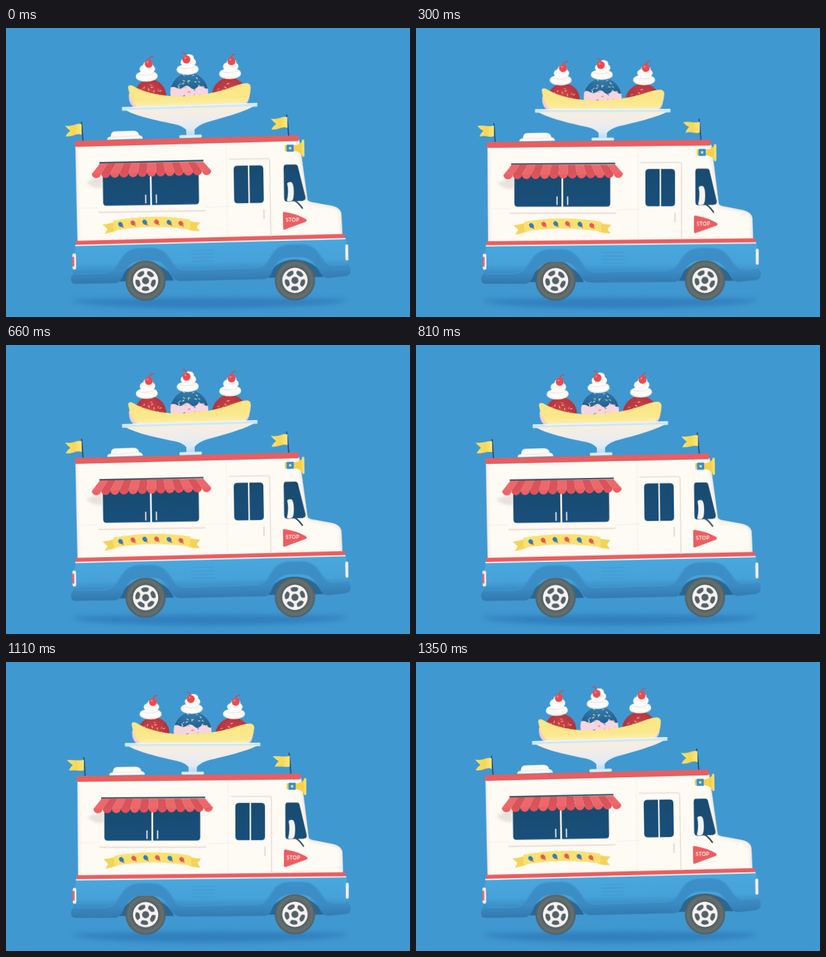
These frames come from a looping animation (683x489 px, 1380 ms). An HTML page:

```html
<!DOCTYPE html>
<html lang="en">
<head>
<meta charset="utf-8">
<title>Ice cream truck</title>
<style>
html, body { margin: 0; width: 100%; height: 100%; overflow: hidden; background: #4098d0; }
svg { display: block; width: 683px; height: 489px; }
.bob, .sundae { animation: 345ms cubic-bezier(.37, 0, .63, 1) -678ms infinite alternate; }
.bob { transform-origin: 115px 432px; animation-name: bob; }
.sundae { transform-origin: 316px 190px; animation-name: sway; }
.spin { animation: spin 1380ms linear infinite; }
.flag { fill: url(#flagFill); animation: wave 1380ms ease-in-out infinite; }
@keyframes bob { from { transform: rotate(-.92deg) scaleY(1.008); } to { transform: none; } }
@keyframes sway { from { transform: rotate(-.85deg) scaleY(1.033); } to { transform: none; } }
@keyframes spin { from { transform: rotate(36deg); } 97.8%, to { transform: rotate(396deg); } }
@keyframes wave {
  0%, 50%, 98%, to { d: path("M0 0C-8 -3 -15 5 -28 2Q-24 7 -19 11Q-25 15 -27 20C-15 22 -9 14 0 18Z"); }
  25%, 75% { d: path("M0 0C-9 4 -16 -2 -28 1Q-24 6 -18 9Q-23 14 -24 19C-14 15 -8 22 0 18Z"); }
  38%, 88% { d: path("M0 1C-9 1 -16 5 -30 1Q-25 6 -20 10Q-25 14 -27 19C-15 21 -8 18 0 19Z"); }
}
</style>
</head>
<body>
<svg viewBox="0 0 683 489">
  <defs>
    <filter id="soft" x="-20%" y="-60%" width="140%" height="220%"><feGaussianBlur stdDeviation="4"/></filter>
    <filter id="fuzz" x="-20%" y="-20%" width="140%" height="140%"><feGaussianBlur stdDeviation="2"/></filter>
    <linearGradient id="flagFill"><stop offset="0" stop-color="#fae26c"/><stop offset=".55" stop-color="#f6d656"/><stop offset="1" stop-color="#ffe87c"/></linearGradient>
    <linearGradient id="lower" x2="0" y2="1"><stop offset="0" stop-color="#4aa8de"/><stop offset=".65" stop-color="#46a2d9"/><stop offset="1" stop-color="#3587c1"/></linearGradient>
    <linearGradient id="sill" x2="0" y2="1"><stop offset="0" stop-color="#3c8fc8"/><stop offset=".65" stop-color="#3b8cc4"/><stop offset="1" stop-color="#3179ae"/></linearGradient>
    <linearGradient id="glass" x2="0" y2="1"><stop offset="0" stop-color="#194b70"/><stop offset="1" stop-color="#184f7b"/></linearGradient>
    <linearGradient id="banana" x2="0" y2="1"><stop offset="0" stop-color="#fbe684"/><stop offset=".7" stop-color="#fbe88c"/><stop offset="1" stop-color="#fceeb0"/></linearGradient>
    <linearGradient id="bowl" x2="0" y2="1"><stop offset="0" stop-color="#f8efdc"/><stop offset=".4" stop-color="#f0ecec"/><stop offset=".75" stop-color="#dfebf4"/><stop offset="1" stop-color="#b9dcf2"/></linearGradient>
    <radialGradient id="red" cx=".5" cy=".35" r=".7"><stop offset="0" stop-color="#cc434a"/><stop offset="1" stop-color="#a12a37"/></radialGradient>
    <radialGradient id="blue" cx=".5" cy=".3" r=".75"><stop offset="0" stop-color="#317caf"/><stop offset="1" stop-color="#215f8e"/></radialGradient>
    <radialGradient id="tyre"><stop offset=".6" stop-color="#515f65"/><stop offset=".85" stop-color="#65716f"/><stop offset="1" stop-color="#505d62"/></radialGradient>
    <path id="shell" d="M121 198L498 193Q500 200 501 208L512 298Q514 302 524 303L554 309Q569 313 569 325L570 361L122 366Z"/>
    <clipPath id="inShell"><use href="#shell"/></clipPath>
    <clipPath id="inScoop"><circle cx="316" cy="117" r="32"/></clipPath>
    <clipPath id="inDish"><rect x="200" y="40" width="240" height="93"/></clipPath>
    <g id="rim">
      <circle r="34" fill="url(#tyre)"/>
      <circle r="22.500" fill="#46545b"/>
      <circle r="21.500" fill="#f6f1ee"/>
    </g>
    <g id="cream">
      <ellipse cx="0" cy="10" rx="18.500" ry="8.500" fill="#f4f0ed"/>
      <ellipse cx="0" cy="8.500" rx="18" ry="7.500" fill="#fffdfb"/>
      <path d="M-13 6Q0 11 15 4" fill="none" stroke="#ece6e3" stroke-width="1.500"/>
      <ellipse cx="1.500" cy="-2" rx="13" ry="8" fill="#fffdfb"/>
      <path d="M-8 -4Q2 1 12 -5" fill="none" stroke="#efe9e6"/>
      <ellipse cx="3" cy="-9" rx="8" ry="6" fill="#fffdfb"/>
    </g>
    <g id="cherry">
      <circle r="6.700" fill="#e94b50"/>
      <circle cx="-2" cy="-2.500" r="1.600" fill="#f5898a"/>
    </g>
  </defs>

  <rect width="683" height="489" fill="#4098d0"/>
  <path d="M112 460Q345 453 575 459Q580 466 500 470Q345 479 190 471Q115 467 112 460Z" fill="#2f7bbb" opacity=".85" filter="url(#soft)"/>

  <g class="bob">
    <g class="sundae">
      <path d="M206 142C225 153 258 161 290 168Q303 171 309 178V187H323V178Q329 171 342 167C372 160 407 152 426 142Z" fill="url(#bowl)"/>
      <rect x="297" y="186" width="38" height="5" rx="2" fill="#d8ecf8"/>
      <path d="M214 116Q212 133 224 140H410Q420 133 418 113L350 126H290Z" fill="#f6cbd1"/>
      <g clip-path="url(#inDish)">
        <circle cx="250" cy="121" r="27" fill="url(#red)"/>
        <circle cx="384" cy="125" r="30" fill="url(#red)"/>
        <circle cx="316" cy="117" r="32" fill="#f6d5df"/>
        <path clip-path="url(#inScoop)" d="M280 80H352V109Q346 114 341 110Q335 105 330 109Q324 115 318 109Q313 104 307 108Q300 113 295 109Q289 105 280 110Z" fill="url(#blue)"/>
        <g id="sprinkles" stroke-width="1.300" stroke-linecap="round"></g>
      </g>
      <use href="#cream" x="245" y="79"/>
      <use href="#cream" x="314.500" y="70"/>
      <use href="#cream" x="386" y="79"/>
      <path d="M249 63Q251 57 257 57M313 58Q312 52 307 52M388 63Q390 57 396 57" fill="none" stroke="#d6444b" stroke-width="1.700" stroke-linecap="round"/>
      <use href="#cherry" x="249" y="68.500"/>
      <use href="#cherry" x="313" y="63.500"/>
      <use href="#cherry" x="389" y="68.500"/>
      <path d="M213 106Q213 101 220 103Q247 120 295 123Q349 124 390 110Q405 105 414 105Q421 106 420 114Q419 130 408 138H228Q216 128 213 106Z" fill="url(#banana)"/>
      <rect x="201.500" y="137.500" width="229" height="6" rx="1" fill="#e0eff6" opacity=".88"/>
      <path d="M202 138.200H430" stroke="#f7fbfd"/>
    </g>

    <g stroke="#2a4b66" stroke-width="2" stroke-linecap="round"><path d="M134 193L132 162M482 190L479 155"/></g>
    <path class="flag" transform="translate(132 165)" d="M0 0L-28 2L-19 11L-27 20L0 18Z"/>
    <path class="flag" transform="translate(480 159)" d="M0 0L-28 2L-19 11L-27 20L0 18Z"/>
    <path d="M175 192Q175 187 181 187Q181 178 189 178L220 177.500Q228 178 229 185Q235 186 235 191Z" fill="#fdfaf6"/>
    <path d="M183 187Q205 188 228 185.500" fill="none" stroke="#e8e4e1"/>

    <use href="#shell" fill="#fefaf4"/>
    <g clip-path="url(#inShell)">
      <use href="#shell" fill="none" stroke="#dccfc4" stroke-width="5" opacity=".5" filter="url(#fuzz)"/>
      <path d="M138 262Q150 275 166 272V252Z" fill="#d9d2cd" opacity=".6" filter="url(#fuzz)"/>
      <g fill="none" stroke="#f3ede6"><path d="M122 306H160M340 308L380 307M376 202V357"/></g>
    </g>
    <rect x="120" y="191.500" width="379" height="9.500" rx="3" fill="#e95e60" transform="rotate(-.55 309 197)"/>
    <path d="M122 202.500L498 198.800" stroke="#c84e52" opacity=".5"/>

    <path d="M119 368L576 364L579 413L114 419L117 380Z" fill="url(#lower)"/>
    <path d="M119 364.300L574 359.800" stroke="#e95e60" stroke-width="7"/>
    <path d="M118 368.600L575 364.200" stroke="#fff8f2" stroke-width="2"/>
    <path d="M314 380H353M314 386H353M314 392H353M314 398H353" stroke="#4198d0" stroke-width="1.200"/>
    <rect x="113" y="382" width="6" height="27" rx="3" fill="#f9ece7"/>
    <rect x="113" y="387" width="3" height="17" rx="1.500" fill="#e9686a"/>
    <rect x="574.500" y="374" width="5" height="27" rx="2.500" fill="#f4eee8"/>

    <path d="M380 228H445Q449 228 449 232V358" fill="none" stroke="#eae2da" stroke-width="2"/>
    <rect x="387" y="238" width="52" height="65" rx="6" fill="#f6f2ed"/>
    <path d="M394 239H412V302H394Q388 302 388 296V245Q388 239 394 239ZM414.500 239H432Q438 239 438 245V296Q438 302 432 302H414.500Z" fill="url(#glass)"/>
    <path d="M438 314V328" stroke="#e4dcd5" stroke-width="2.500" stroke-linecap="round"/>
    <path d="M476 238H492Q496 238 497 242L509 293Q510 299 504 300L478 301Q472 301 472 295V244Q472 238 476 238Z" fill="url(#glass)" stroke="#f6f1eb"/>
    <path d="M487 298Q494 299 503 312" fill="none" stroke="#354a5d" stroke-width="2.500" stroke-linecap="round"/>
    <path d="M478 270Q480 267 485 268Q489 270 489 284Q489 296 486 299Q480 301 477 299Q481 284 478 270Z" fill="#f7f4f0"/>

    <path d="M166 248H329V297Q329 303 323 303H172Q166 303 166 297Z" fill="url(#glass)" stroke="#f3eee8"/>
    <path d="M247.500 248V303" stroke="#f5f0ea" stroke-width="3"/>
    <path d="M238.500 286V299M256.500 286V299" stroke="#f5f0ea" stroke-width="2" stroke-linecap="round"/>
    <rect x="158" y="309" width="181" height="6" rx="2" fill="#e9e1da"/>
    <rect x="158" y="308" width="181" height="4.500" rx="2" fill="#fffaf4"/>
    <path d="M161 230.500L337 229.500" stroke="#344c62" stroke-width="2.500"/>
    <g id="awning"></g>

    <path d="M165 334Q177 333 188 329L188 345Q178 348 168 350L173 342ZM330 333Q318 333 308 329L309 345Q318 348 329 348L324 341Z" fill="#f3d45a"/>
    <path d="M183 328Q248 317 313 328L313 345Q248 334 183 345Z" fill="#fae071"/>
    <g id="treats"></g>

    <path d="M473 318Q470 317 470 321V345Q470 349 474 347L508 335Q512 333 508 330Q492 321 473 318Z" fill="#ec5d62"/>
    <text x="474.500" y="335" font-family="Lato, sans-serif" font-weight="700" font-size="8.500" letter-spacing=".4" fill="#fff4ef">STOP</text>

    <path d="M475 206H482V216H475Z" fill="#f1c942"/>
    <path d="M490 206Q499 206 504 200V223Q499 216 490 216Z" fill="#f6d24b"/>
    <rect x="478" y="205" width="12" height="12" rx="1" fill="#338fd0"/>
    <circle cx="484" cy="211" r="2.200" fill="#f8df75"/>
    <rect x="504" y="197" width="4" height="29" rx="2" fill="#fbdf67"/>

    <path d="M192 430C202 390 268 390 284 430ZM444 428C454 388 520 388 537 428Z" fill="#2b6794"/>
  </g>

  <g class="wheel" transform="translate(236 427.500)"><use href="#rim"/></g>
  <g class="wheel" transform="translate(488.500 427)"><use href="#rim"/></g>

  <g class="bob">
    <path d="M118 415L165 415C185 413 188 400 196 390Q207 374 228 374H246C266 374 274 386 282 398Q290 412 304 412L420 410C440 410 443 398 450 388Q460 372 482 372H500C520 372 528 384 536 396Q543 408 554 408L576 407Q583 408 583 417Q583 426 575 427L545 430Q536 430 531 420C522 402 515 395 499 394H479C464 395 456 404 451 415Q446 430 437 430L296 431Q284 431 279 420C270 402 262 396 246 396H227C212 397 204 406 199 418Q194 432 185 433H118Q110 433 110 425Q110 416 118 415Z" fill="url(#sill)"/>
    <path d="M118 416L165 416C185 414 189 401 197 391Q207 375 228 375H246C266 375 273 387 281 399Q289 413 304 413L420 411C440 411 444 399 451 389Q460 373 482 373H500C520 373 527 385 535 397Q542 409 554 409L576 408" fill="none" stroke="#4ba3d9" stroke-width="1.500" opacity=".5"/>
  </g>
</svg>
<script>
const $ = id => document.getElementById(id);
const mix = (a, b, k) => a + (b - a) * k;

let seed = 7;
const rnd = () => (seed = seed * 16807 % 2147483647) / 2147483647;

function sprinkle(cx, cy, r, count, colours) {
  let out = '';
  for (let i = 0; i < count; i++) {
    const a = Math.PI * (1 + (i + .2 + rnd() * .6) / count);
    const d = r * (.4 + .5 * rnd());
    const x = cx + Math.cos(a) * d, y = cy + Math.sin(a) * d;
    const turn = rnd() * Math.PI;
    out += `<path d="M${x} ${y}l${3 * Math.cos(turn)} ${3 * Math.sin(turn)}" stroke="${colours[i % colours.length]}"/>`;
  }
  return out;
}
const warm = ['#f3c0ac', '#f0d080', '#e98a86'];
$('sprinkles').innerHTML =
  sprinkle(250, 121, 24, 11, warm) +
  sprinkle(384, 125, 28, 13, warm) +
  sprinkle(316, 111, 28, 14, ['#f3e6d0', '#f2d674', '#9fcbe6']) +
  sprinkle(316, 128, 24, 7, ['#e0656c', '#3f7fae', '#e8b95a']);

const strips = 13;
for (let i = 0; i < strips; i++) {
  const k = i / strips, n = (i + 1) / strips;
  const [a, b] = [mix(162, 337, k), mix(162, 337, n)];
  const [c, d] = [mix(148, 350, k), mix(148, 350, n)];
  const [yc, yd] = [mix(249, 246.5, k), mix(249, 246.5, n)];
  $('awning').innerHTML += `<path d="M${a} 231.5H${b}L${d} ${yd}A7.8 8 0 0 1 ${c} ${yc}Z" fill="${i % 2 ? '#d9535a' : '#ec686b'}"/>` +
    `<path d="M${c} ${yc}A7.8 8 0 0 0 ${d} ${yd}Z" fill="#ee555a" opacity=".4"/>`;
}

[196, 217, 237, 257, 278, 298].forEach((x, i) => {
  const y = 332 + (x - 247) ** 2 / 800;
  const [top, tail] = i % 2 ? ['#e4585c', '#d98a4b'] : ['#2f7fb5', '#dc5a5c'];
  $('treats').innerHTML += `<g transform="translate(${x} ${y}) rotate(-40) scale(1.2)">` +
    `<path d="M-2.5 0H2.5L0 6Z" fill="${tail}"/><ellipse cy="-1" rx="3" ry="3.6" fill="${top}"/></g>`;
});

const holes = Array.from({ length: 5 }, (_, i) =>
  `<path transform="rotate(${i * 72})" d="M-6.5 -15.5Q0 -19.5 6.5 -15.5Q6.500 -11 3 -10H-3Q-6.500 -11 -6.5 -15.5Z" fill="#52616a"/>`).join('');
document.querySelectorAll('.wheel').forEach(w => {
  w.innerHTML += `<g class="spin">${holes}<circle r="6" fill="#52616a"/></g>`;
});
</script>
</body>
</html>
```
